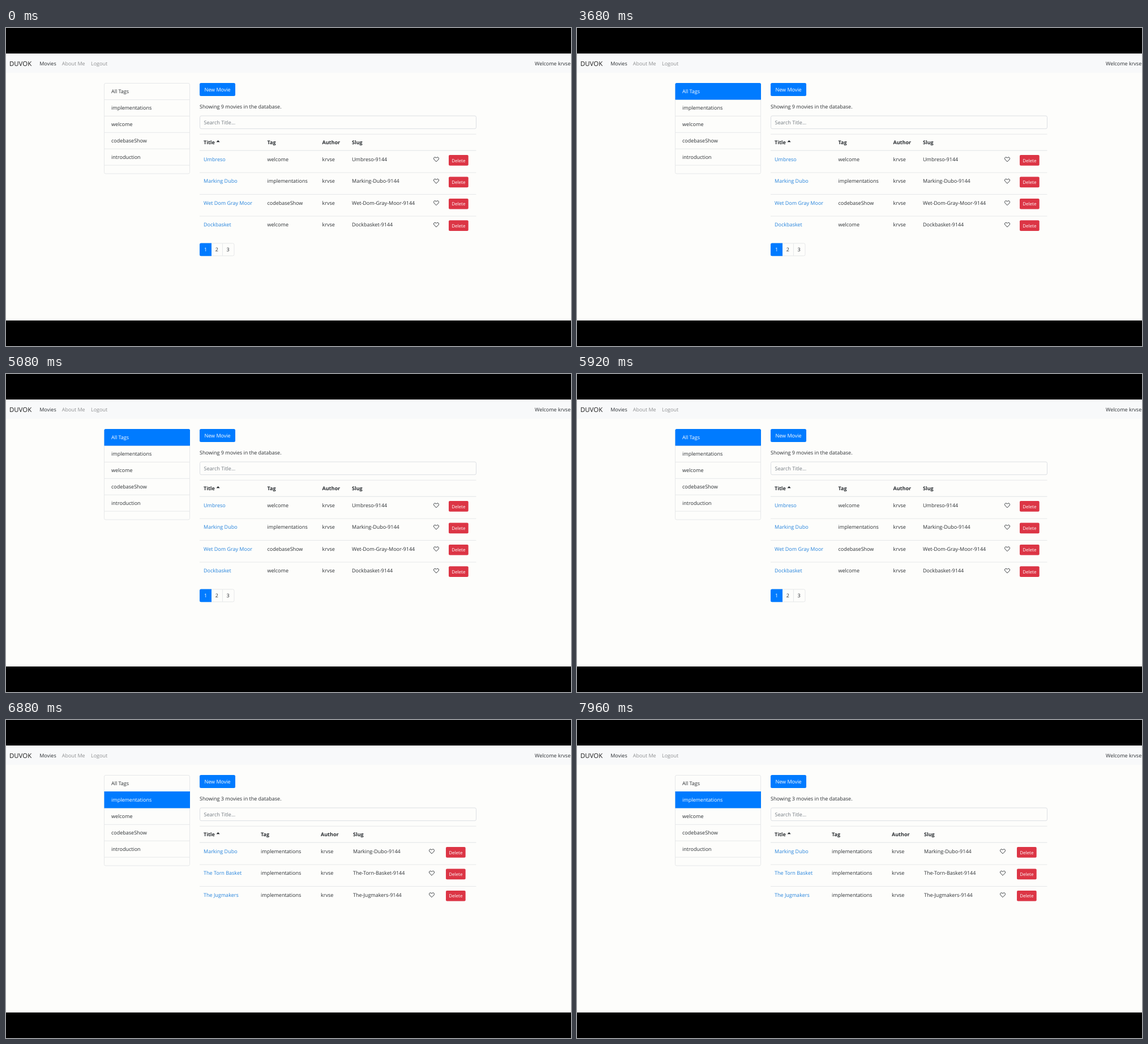
An HTML page for the animation above (8000 ms loop, 998 by 561 pixels).

```html
<!DOCTYPE html>
<html lang="en">
<head>
<meta charset="utf-8">
<title>Movie list</title>
<style>
  html, body { margin: 0; width: 100%; height: 100%; overflow: hidden; background: #000; }
  svg { display: block; width: 100%; height: 100%; }
  text {
    font: 9px "Open Sans", "Noto Sans", sans-serif;
    fill: #2b2f33;
    text-rendering: geometricPrecision;
    white-space: pre;
  }
  .brand { font-size: 11.4px; fill: #1c1c1c; }
  .muted { fill: #8f9092; }
  .hint { fill: #747b82; }
  .head { font-weight: 700; }
  .link { fill: #2583dc; }
  .white { fill: #fff; }
  .small { font-size: 8px; }
  .mid { text-anchor: middle; }
</style>
</head>
<body>
<svg id="stage" viewBox="0 0 998 561" xmlns="http://www.w3.org/2000/svg"></svg>
<script>
const LOOP = 8000, SELECT_ALL = 3680, SELECT_TAG = 5960;
const BLUE = '#007bff', RED = '#dc3545', LINE = '#e6e8e9', PAGE = '#fdfdfb';
const USER = 'krvse';
const TAGS = ['All Tags', 'implementations', 'welcome', 'codebaseShow', 'introduction'];
const ROW = 38.45, ITEM = 29;

const allMovies = {
  count: 9,
  cols: { tag: 461.5, author: 558.5, slug: 611, heart: 760, del: 782 },
  rows: [
    ['Umbreso', 'welcome'],
    ['Marking Dubo', 'implementations'],
    ['Wet Dom Gray Moor', 'codebaseShow'],
    ['Dockbasket', 'welcome']
  ],
  pages: 3
};
const taggedMovies = {
  count: 3,
  cols: { tag: 450, author: 556, slug: 613, heart: 752, del: 777 },
  rows: [
    ['Marking Dubo', 'implementations'],
    ['The Torn Basket', 'implementations'],
    ['The Jugmakers', 'implementations']
  ],
  pages: 0
};

const text = (x, y, s, cls = '') => `<text x="${x}" y="${y}" class="${cls}">${s}</text>`;
const box = (x, y, w, h, fill, r = 0, stroke = 'none') =>
  `<rect x="${x}" y="${y}" width="${w}" height="${h}" rx="${r}" fill="${fill}" stroke="${stroke}"/>`;
const rule = (x1, x2, y, w = 1) =>
  `<path d="M${x1} ${y}H${x2}" stroke="${LINE}" stroke-width="${w}"/>`;

function heart(x, y) {
  return `<path transform="translate(${x} ${y})" fill="none" stroke="#34383c" stroke-width="1"
    d="M0 4.2L-3.8 .4C-5.2 -1.2 -4.3 -3.7 -2.4 -3.7C-1.3 -3.7 -.6 -3.1 0 -2.3C.6 -3.1 1.3 -3.7 2.4 -3.7C4.3 -3.7 5.2 -1.2 3.8 .4Z"/>`;
}

function navbar() {
  return box(0, 45, 998, 34, '#f8f9fa') +
    text(6, 67, 'DUVOK', 'brand') +
    text(59.2, 66.2, 'Movies') +
    text(98.8, 66.2, 'About Me', 'muted') +
    text(150, 66.2, 'Logout', 'muted') +
    text(934, 66.2, 'Welcome ' + USER);
}

function sidebar(active) {
  let out = box(173.5, 97.5, 151, 159.5, PAGE, 2.5, LINE);
  TAGS.forEach((tag, i) => { out += rule(174, 324, 126.5 + i * 28.9); });
  if (active === 0)
    out += `<path d="M173.5 126.5V99.5a2.5 2.5 0 0 1 2.5 -2.5H322.5a2.5 2.5 0 0 1 2.5 2.5V126.5Z" fill="${BLUE}"/>`;
  if (active > 0)
    out += box(173.5, 97 + active * ITEM, 151.5, 29.5, BLUE);
  TAGS.forEach((tag, i) => {
    out += text(186, 115.2 + i * ITEM, tag, i === active ? 'white' : '');
  });
  return out;
}

function table({ cols, rows }) {
  let out = rule(342, 830.5, 187.3) + rule(342, 830.5, 216.2, 1.2) +
    text(349, 205, 'Title', 'head') +
    '<path d="M371.5 201.2L374.6 198L377.7 201.2Z" fill="#212529"/>' +
    text(cols.tag, 205, 'Tag', 'head') +
    text(cols.author, 205, 'Author', 'head') +
    text(cols.slug, 205, 'Slug', 'head');
  rows.forEach(([title, tag], i) => {
    const y = 235 + i * ROW;
    if (i) out += rule(342, 830.5, 216.6 + i * ROW);
    out += text(349, y, title, 'link') +
      text(cols.tag, y, tag) +
      text(cols.author, y, USER) +
      text(cols.slug, y, title.replace(/ /g, '-') + '-9144') +
      heart(cols.heart, y - 3.4) +
      box(cols.del, y - 11, 34.7, 18.7, RED, 2) +
      text(cols.del + 17.3, y + 1.5, 'Delete', 'white small mid');
  });
  return out;
}

function pager(pages) {
  if (!pages) return '';
  let out = box(342.5, 379.9, 60.5, 22, PAGE, 2.5, LINE) +
    `<path d="M382.5 380V402" stroke="${LINE}"/>` +
    `<path d="M363 379.5V402.3H344.5a2.5 2.5 0 0 1 -2.5 -2.5V382a2.5 2.5 0 0 1 2.5 -2.5Z" fill="${BLUE}"/>`;
  for (let i = 0; i < pages; i++)
    out += text(352.5 + i * 19.8, 394.3, i + 1, i ? 'mid' : 'mid white');
  return out;
}

function screen(list, active) {
  return box(0, 0, 998, 561, '#000') + box(0, 45, 998, 471, PAGE) +
    navbar() + sidebar(active) +
    box(342, 97, 63, 23, BLUE, 2.5) + text(373.5, 112.1, 'New Movie', 'white mid') +
    text(342, 142, `Showing ${list.count} movies in the database.`) +
    box(342.5, 155, 488, 22.7, PAGE, 2.5, '#dcdfe3') +
    text(349.5, 169.8, 'Search Title...', 'hint') +
    table(list) + pager(list.pages);
}

const stage = document.getElementById('stage');
let shown;

function draw(now) {
  const t = now % LOOP;
  const active = t < SELECT_ALL ? -1 : t < SELECT_TAG ? 0 : 1;
  if (active !== shown) {
    shown = active;
    stage.innerHTML = screen(active === 1 ? taggedMovies : allMovies, active);
  }
}

const start = performance.now();
function tick() {
  draw(performance.now() - start);
  requestAnimationFrame(tick);
}
tick();
</script>
</body>
</html>
```
